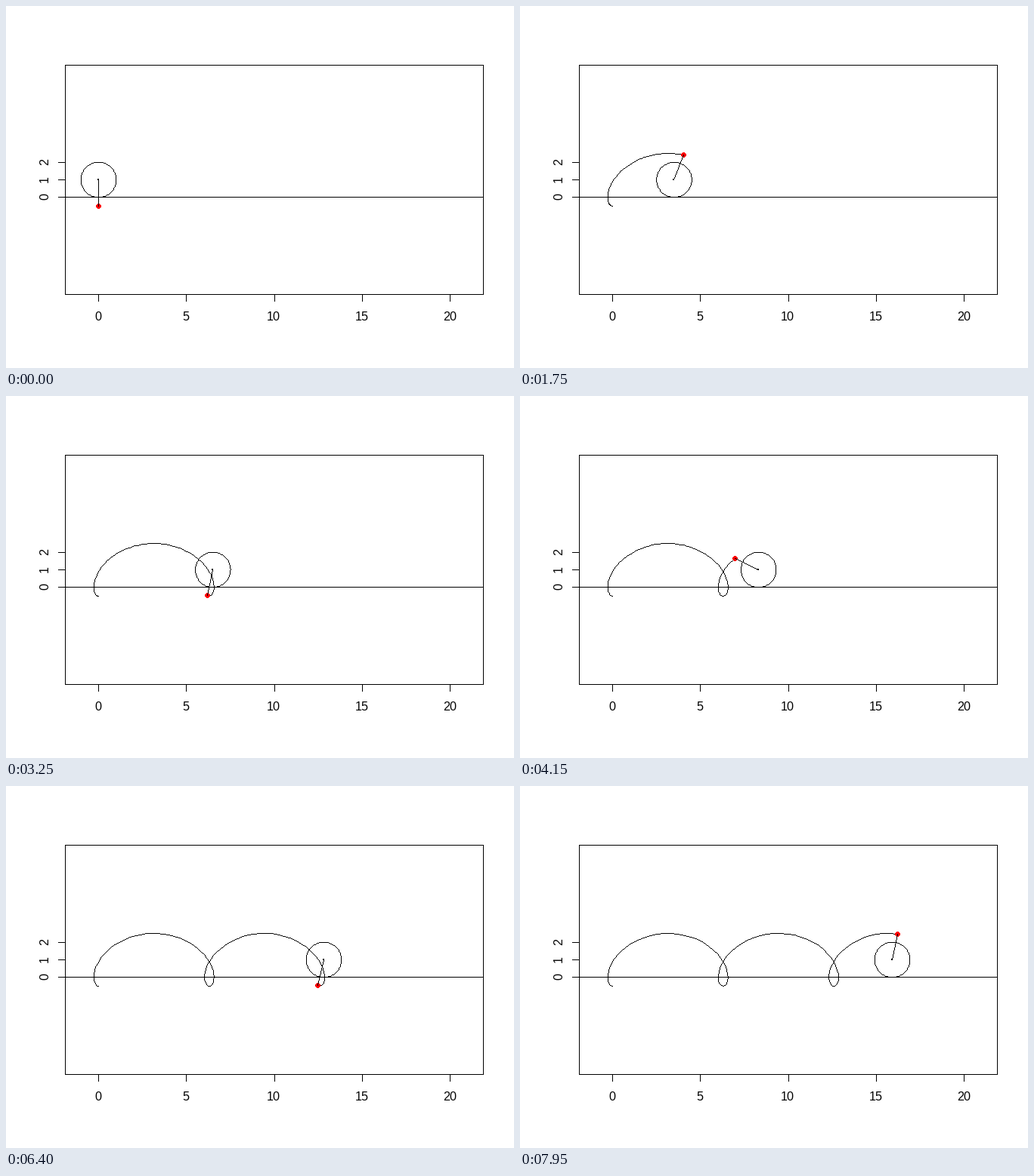
Recreate the animation shown at these times as a matplotlib script. Size 672 by 480 pixels, loop 8 s.

```python
import numpy as np
import matplotlib.pyplot as plt
from matplotlib.animation import FuncAnimation

W, H, DPI = 672, 480, 96
FRAMES, INTERVAL, STEP = 160, 50, 0.1
ARM = 1.5                                  # pen distance, wheel radius is 1
LEFT, RIGHT, TOP, BOTTOM = 78.72, 631.68, 78.72, 382.08
UNIT = (RIGHT - LEFT) / 23.76              # pixels per data unit
X0 = LEFT + 1.88 * UNIT                    # pixel position of the data origin
Y0 = (TOP + BOTTOM) / 2 + UNIT
TICK = 9
BLACK, RED = (0, 0, 0), (255, 0, 0)

plt.rcParams["font.family"] = "Liberation Sans"
plt.rcParams["text.hinting"] = "native"
plt.rcParams["text.hinting_factor"] = 1

fig = plt.figure(figsize=(W / DPI, H / DPI), dpi=DPI, facecolor="white")
ax = fig.add_axes([0, 0, 1, 1])


def to_px(x, y):
    return X0 + UNIT * np.asarray(x), Y0 - UNIT * np.asarray(y)


def polyline(img, xs, ys):
    """Draw a crisp one-pixel line through pixel points."""
    xs, ys = np.floor(xs).astype(int), np.floor(ys).astype(int)
    for xa, ya, xb, yb in zip(xs[:-1], ys[:-1], xs[1:], ys[1:]):
        n = max(abs(xb - xa), abs(yb - ya)) + 1
        cols = np.floor(np.linspace(xa, xb, n) + 0.5).astype(int)
        rows = np.floor(np.linspace(ya, yb, n) + 0.5).astype(int)
        img[rows, cols] = BLACK


def disc(img, x, y, r):
    x, y = int(x), int(y)
    dy, dx = np.mgrid[-r:r + 1, -r:r + 1]
    inside = dx ** 2 + dy ** 2 <= r * r + 1
    img[y + dy[inside], x + dx[inside]] = RED


def pen(t):
    return t - ARM * np.sin(t), 1 - ARM * np.cos(t)


def draw_axes(img):
    polyline(img, [LEFT, RIGHT, RIGHT, LEFT, LEFT],
             [TOP, TOP, BOTTOM, BOTTOM, TOP])
    polyline(img, [LEFT, RIGHT], [Y0, Y0])
    for v in range(0, 21, 5):
        x, _ = to_px(v, 0)
        polyline(img, [x, x], [BOTTOM, BOTTOM + TICK])
        ax.text(x - 1, 417, str(v), size=12, ha="center", va="baseline")
    for v in range(3):
        _, y = to_px(0, v)
        polyline(img, [LEFT - TICK, LEFT], [y, y])
        ax.text(56, y - 1, str(v), size=12, rotation=90,
                rotation_mode="anchor", ha="center", va="baseline")


base = np.full((H, W, 3), 255, np.uint8)
draw_axes(base)
canvas = ax.imshow(base, extent=(0, W, H, 0), aspect="auto",
                   interpolation="nearest", zorder=0)
ax.set_xlim(0, W)
ax.set_ylim(H, 0)
ax.axis("off")
angle = np.linspace(0, 2 * np.pi, 101)


def update(i):
    t = i * STEP
    img = base.copy()
    polyline(img, *to_px(t + np.cos(angle), 1 + np.sin(angle)))
    # the whole curve is resampled with a fixed number of points
    polyline(img, *to_px(*pen(np.linspace(0, t, 100))))
    hub_x, hub_y = to_px(t, 1)
    tip_x, tip_y = to_px(*pen(t))
    disc(img, tip_x, tip_y, 3)
    polyline(img, [hub_x, tip_x], [hub_y, tip_y])
    x, y = int(hub_x), int(hub_y)
    img[y - 1:y + 1, x - 1:x + 1] = BLACK
    canvas.set_data(img)
    return canvas,


anim = FuncAnimation(fig, update, frames=FRAMES, interval=INTERVAL,
                     init_func=lambda: update(0), repeat=True,
                     repeat_delay=0, blit=False)
plt.show()
```
